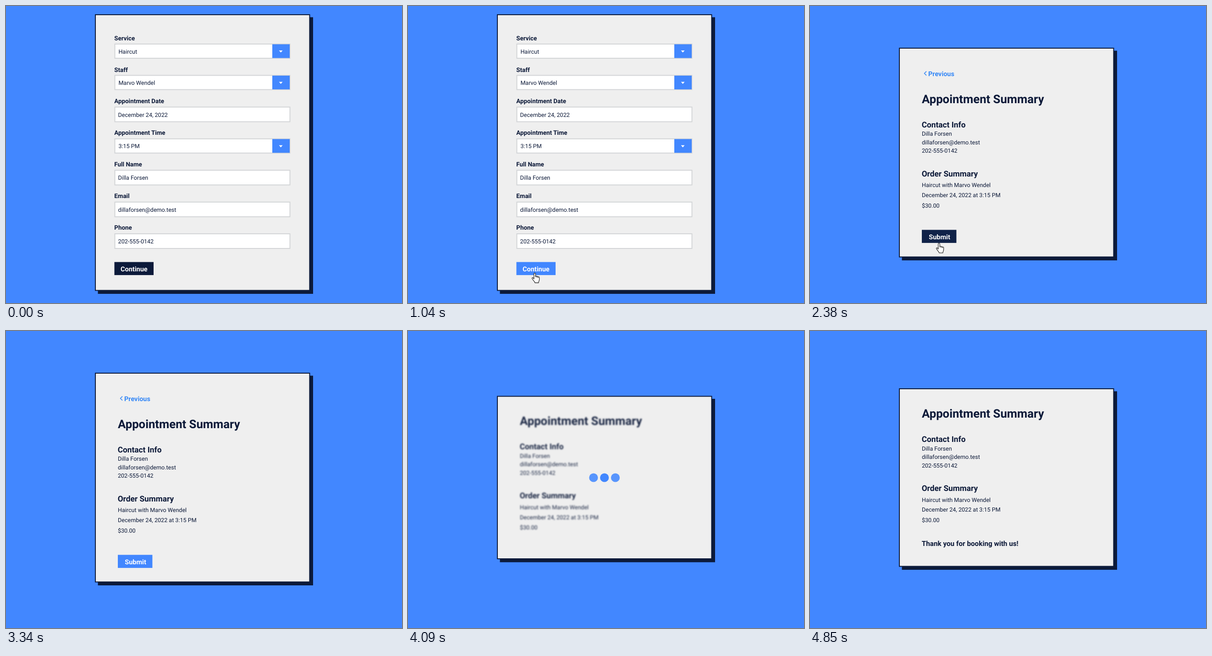
Animation of 864x648 px, one loop 5950 ms. Source, as an HTML page:

```html
<!DOCTYPE html>
<html lang="en">
<head>
<meta charset="utf-8">
<title>Appointment booking</title>
<style>
  html, body { margin: 0; width: 100%; height: 100%; overflow: hidden; background: #4287ff; }
  svg { display: block; width: 100%; height: 100%; }
  text { font-family: Roboto, sans-serif; font-size: 12.57px; fill: #0c1938; text-rendering: geometricPrecision; white-space: pre; }
  .label { font-size: 13.38px; font-weight: 700; }
  .title { font-size: 25.7px; font-weight: 700; }
  .head { font-size: 17.3px; font-weight: 700; }
  .thanks { font-size: 15.25px; font-weight: 700; }
  .button { font-size: 14.55px; font-weight: 700; fill: #fff; }
  .link { font-size: 14.4px; font-weight: 700; fill: #3487f6; }
</style>
</head>
<body>
<svg id="stage" viewBox="0 0 864 648"></svg>
<script>
const LOOP = 5950;
const NAVY = [12, 26, 58], BLUE = [66, 135, 255];
const rgb = c => `rgb(${c.map(Math.round)})`;
const stage = document.getElementById('stage');

function add(parent, tag, attrs = {}, text = '') {
  const node = document.createElementNS(stage.namespaceURI, tag);
  set(node, attrs);
  node.textContent = text;
  return parent.appendChild(node);
}
function set(node, attrs) {
  for (const key in attrs) node.setAttribute(key, attrs[key]);
}
const group = parent => add(parent, 'g');
const box = (parent, x, y, width, height, fill) => add(parent, 'rect', { x, y, width, height, fill });
const write = (parent, x, y, text, kind = '') => add(parent, 'text', { x, y, class: kind }, text);
const show = (node, on) => { node.style.display = on ? '' : 'none'; };
const clamp = v => Math.min(1, Math.max(0, v));
const smooth = v => { v = clamp(v); return v * v * (3 - 2 * v); };

const guest = 'Dilla Forsen', email = 'dillaforsen@demo.test', phone = '202-555-0142';
const stylist = 'Marvo Wendel', day = 'December 24, 2022', hour = '3:15 PM';

// Card
box(stage, 0, 0, 864, 648, rgb(BLUE));
const shadow = box(stage, 200.5, 0, 469.5, 0, rgb(NAVY));
const card = add(stage, 'rect', { x: 195, width: 467.5, fill: '#efefef', stroke: rgb(NAVY), 'stroke-width': 2 });

function placeCard(top, bottom) {
  set(card, { y: top + 1, height: bottom - top - 2 });
  set(shadow, { y: top + 6.5, height: bottom - top });
}

// Booking form
const form = group(stage);
function field(label, labelY, top, value, isSelect) {
  const height = isSelect ? 33 : 34;
  write(form, 236.3, labelY, label, 'label');
  set(box(form, 237.5, top + 1, 382, height - 2, '#fff'), { stroke: '#d3d5d7', 'stroke-width': 2 });
  write(form, isSelect ? 245.4 : 244.6, top + (isSelect ? 21.6 : 22), value);
  if (!isSelect) return;
  box(form, 581, top + 1.5, 38, 30, rgb(BLUE));
  add(form, 'path', { d: `M595.6 ${top + 15}h8l-4 4.6z`, fill: '#fff' });
}
field('Service', 75, 82, 'Haircut', true);
field('Staff', 143.5, 150.4, stylist, true);
field('Appointment Date', 212, 219.5, day);
field('Appointment Time', 281, 288.8, hour, true);
field('Full Name', 349.7, 357.4, guest);
field('Email', 419, 426.8, email);
field('Phone', 488.2, 496, phone);

function button(parent, x, y, width, text, textX) {
  const face = box(parent, x, y, width, 28.5, rgb(NAVY));
  write(parent, textX, y + 20.2, text, 'button');
  return face;
}
const next = button(form, 236.5, 558.6, 85.5, 'Continue', 249.9);

// Summary
const summary = group(stage);
write(summary, 244, 212, 'Appointment Summary', 'title');
write(summary, 243.7, 265, 'Contact Info', 'head');
write(summary, 243.7, 371.7, 'Order Summary', 'head');
[[283.3, guest], [302, email], [320.4, phone], [395.4, `Haircut with ${stylist}`],
 [417.2, `${day} at ${hour}`], [440, '$30.00']].forEach(([y, text]) => write(summary, 244, y, text));
const thanks = write(summary, 243.8, 491.3, 'Thank you for booking with us!', 'thanks');

const controls = group(stage);
add(controls, 'path', { d: 'M254 142.6l-4.5 4.4 4.5 4.4', fill: 'none', stroke: '#3487f6', 'stroke-width': 1.5 });
write(controls, 258, 153, 'Previous', 'link');
const submit = button(controls, 244, 488.4, 75.4, 'Submit', 259.2);

// Loader
const loader = group(stage);
const dots = [404.8, 428.6, 452.4].map(cx => add(loader, 'circle', { cx, cy: 320, r: 9.6, fill: rgb(BLUE) }));

const hand = add(stage, 'path', {
  d: 'M5 14V2.6a1.7 1.7 0 0 1 3.4 0V9.4 8.8a1.4 1.4 0 0 1 2.8 0V10.4 9.6a1.4 1.4 0 0 1 2.8 0V11.2 10.5' +
     'a1.4 1.4 0 0 1 2.8 0V15c0 3-1.8 4-1.8 7.2H7.2C7 19.5 3 17 1 13c-.8-1.8 1.2-2.8 2.4-1.4L5 14',
  fill: '#fff', stroke: '#111', 'stroke-width': 1.1, 'stroke-linejoin': 'round'
});

function hover(face, t, start) {
  const p = smooth((t - start + 50) / 310);
  const on = t < start ? 0 : p;
  set(face, { fill: rgb(NAVY.map((v, i) => v + (BLUE[i] - v) * on)) });
}
function point(x, y, t, start) {
  set(hand, { transform: `translate(${x} ${y - 4 * smooth((t - start) / 240)})` });
}

function draw(t) {
  const filling = t < 1710, review = !filling && t < 3410;
  const loading = t >= 3410 && t < 4850, done = t >= 4850;

  if (filling) placeCard(18, 621.5);
  else if (review) placeCard(91, 548.5);
  else if (loading) placeCard(141.5, 498);
  else placeCard(125, 514.5);

  show(form, filling);
  show(summary, !filling);
  show(controls, review);
  show(thanks, done);
  show(loader, loading);
  hover(next, t, 620);
  hover(submit, t, 2380);

  const pointing = t >= 620 && t < 1710;
  show(hand, pointing || (t >= 2380 && t < 3340));
  if (pointing) point(269.8, 585.7, t, 620);
  else point(274.8, 516.6, t, 2380);

  const soft = loading ? smooth((t - 3380) / 400) : 0;
  set(summary, { transform: `translate(0 ${loading ? -6.6 : done ? -22.7 : 0})`, opacity: 1 - 0.08 * soft });
  summary.style.filter = soft ? `blur(${1.5 * soft}px)` : 'none';

  loader.setAttribute('opacity', smooth((t - 3410) / 400));
  const beat = Math.min(t, 4710);
  dots.forEach((dot, i) => {
    const phase = (beat - 4090 - (i - 1) * 200) / 1200;
    set(dot, { opacity: 0.74 + 0.26 * Math.cos(phase * 2 * Math.PI) });
  });
}

const began = performance.now();
function tick() {
  draw((performance.now() - began) % LOOP);
  requestAnimationFrame(tick);
}
draw(0);
requestAnimationFrame(tick);
</script>
</body>
</html>
```
